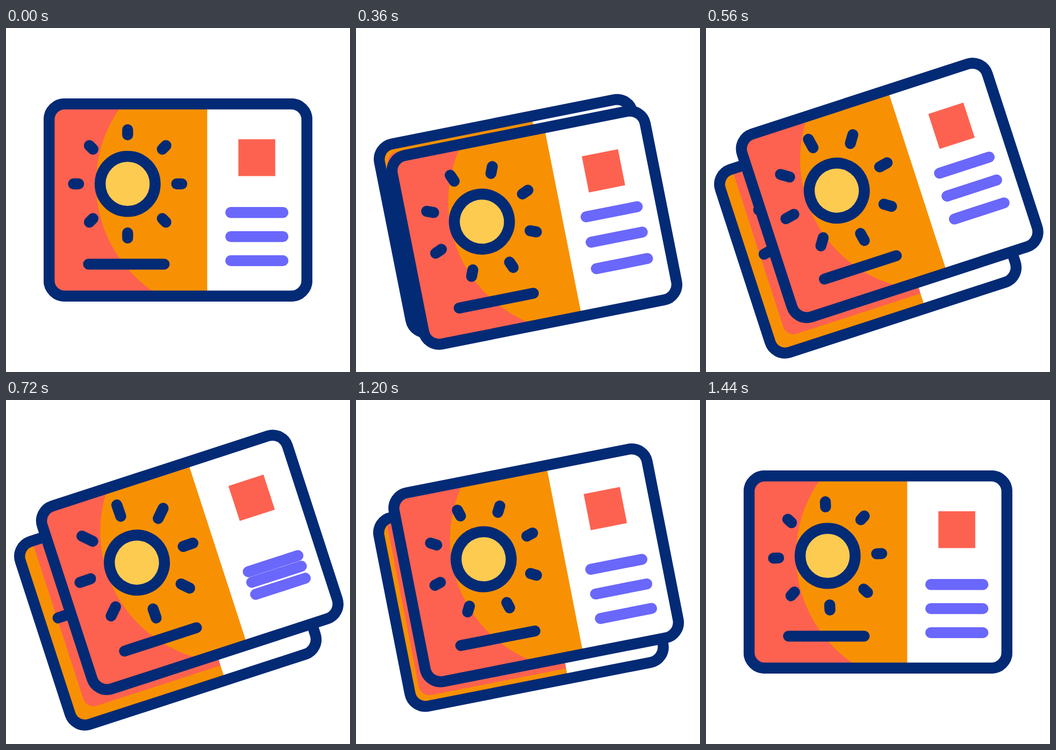
An HTML page that plays this animation: 640 px wide and 640 px high, repeating every 1.48 s.

```html
<!DOCTYPE html>
<html lang="en">
<head>
<meta charset="utf-8">
<title>Postcards</title>
<style>
  html, body { margin: 0; width: 100%; height: 100%; overflow: hidden; background: #fff; }
  svg { display: block; width: 100%; height: 100%; }
  .ink { fill: none; stroke: #032a75; stroke-width: 20.4; stroke-linecap: round; }
  .text { stroke: #6a67fb; stroke-width: 20.4; stroke-linecap: round; }
</style>
</head>
<body>
<svg id="stage" viewBox="0 0 640 640">
  <clipPath id="inside"><rect x="-239.8" y="-178.8" width="479.6" height="357.6" rx="29"/></clipPath>
</svg>
<script>
const LOOP = 1480, STEP = 40, RAYS = 8;
const RED = '#fd6250', ORANGE = '#f79103';
const SUN = { x: -93.7, y: -30 };

// Smooth step from 0 to 1 between two times.
function ease(t, from, to) {
  const u = Math.min(1, Math.max(0, (t - from) / (to - from)));
  return u * u * (3 - 2 * u);
}

function add(parent, tag, attrs) {
  const el = document.createElementNS('http://www.w3.org/2000/svg', tag);
  for (const k in attrs) el.setAttribute(k, attrs[k]);
  return parent.appendChild(el);
}

function makeCard(isFront) {
  const root = add(document.getElementById('stage'), 'g', {});
  const art = add(root, 'g', { 'clip-path': 'url(#inside)' });
  add(art, 'rect', { x: -240, y: -179, width: 480, height: 358, fill: isFront ? RED : ORANGE });
  const red = isFront ? null
    : add(art, 'rect', { x: -229.6, y: -168.6, width: 459.2, height: 337.2, rx: 20, fill: RED });
  if (isFront) add(art, 'circle', { cx: 91, cy: -31, r: 243.5, fill: ORANGE });
  add(art, 'rect', { x: 54.3, y: -179, width: 186, height: 358, fill: '#fff' });

  const lines = [];
  if (isFront) {
    add(art, 'rect', { x: 112.3, y: -113, width: 68.6, height: 68.5, fill: RED });
    for (let i = 0; i < 3; i++) {
      const y = 23.3 + i * 44.8;
      lines.push(add(art, 'line', { class: 'text', x1: 98.2, x2: 195.2, y1: y, y2: y }));
    }
    add(art, 'line', { class: 'ink', x1: -166.4, x2: -25.8, y1: 119.4, y2: 119.4 });
  }

  const sun = add(root, 'g', {});
  const rays = Array.from({ length: RAYS }, (_, i) =>
    add(sun, 'line', { class: 'ink', y1: -91.2, transform: `rotate(${i * 360 / RAYS})` }));
  add(root, 'circle', { class: 'ink', cx: SUN.x, cy: SUN.y, r: 51.2, style: 'fill:#fdcb50' });
  add(root, 'rect', { class: 'ink', x: -239.8, y: -178.8, width: 479.6, height: 357.6, rx: 29 });
  return { root, red, lines, sun, rays };
}

const back = makeCard(false), front = makeCard(true);

function pose(card, x, y, angle, t) {
  card.root.setAttribute('transform', `translate(${320 + x} ${320 + y}) rotate(${angle})`);
  card.sun.setAttribute('transform', `translate(${SUN.x} ${SUN.y}) rotate(${t / LOOP * 90})`);
  const grow = Math.pow(t < 760 ? t / 760 : (LOOP - t) / (LOOP - 760), 1.7);
  card.rays.forEach((ray, i) => {
    // Rays on the upper left stretch the most.
    const reach = 11.6 + 2.7 * Math.cos(i * 2 * Math.PI / RAYS + 1.17);
    ray.setAttribute('y2', -100.7 - reach * grow);
  });
}

// Text lines lift, drop past their place, then settle.
function bounce(t, rebound) {
  const lift = 25;
  return -lift * ease(t, 0, 250) + (lift + rebound) * ease(t, 474, 617) - rebound * ease(t, 617, 1180);
}

function draw(t) {
  const open = ease(t, 80, 560);
  const stay = 1 - ease(t, 1060, 1440);
  const turn = open * (1 - ease(t, 1040, 1420));
  const angle = -18 * turn;

  const bx = -18.9 * open * stay, by = 48.1 * open * stay;
  const fx = 21.9 * ease(t, 100, 590) * stay;
  const fy = (57 * ease(t, 80, 320) - 74.9 * ease(t, 320, 560)) * stay;
  pose(back, bx, by, angle, t);
  pose(front, fx, fy, angle, t);

  // The red panel follows the front card part of the way.
  const a = angle * Math.PI / 180, dx = fx - bx, dy = fy - by, follow = 0.37 * turn;
  const rx = follow * (dx * Math.cos(a) + dy * Math.sin(a));
  const ry = follow * (dy * Math.cos(a) - dx * Math.sin(a));
  back.red.setAttribute('transform', `translate(${rx} ${ry})`);

  front.lines.forEach((line, i) =>
    line.setAttribute('transform', `translate(0 ${bounce(t - 134 - i * 40, 34 - i * 4)})`));
}

const start = performance.now();
function tick() {
  const t = (performance.now() - start) % LOOP;
  draw(Math.floor(t / STEP) * STEP);
  requestAnimationFrame(tick);
}
tick();
</script>
</body>
</html>
```
